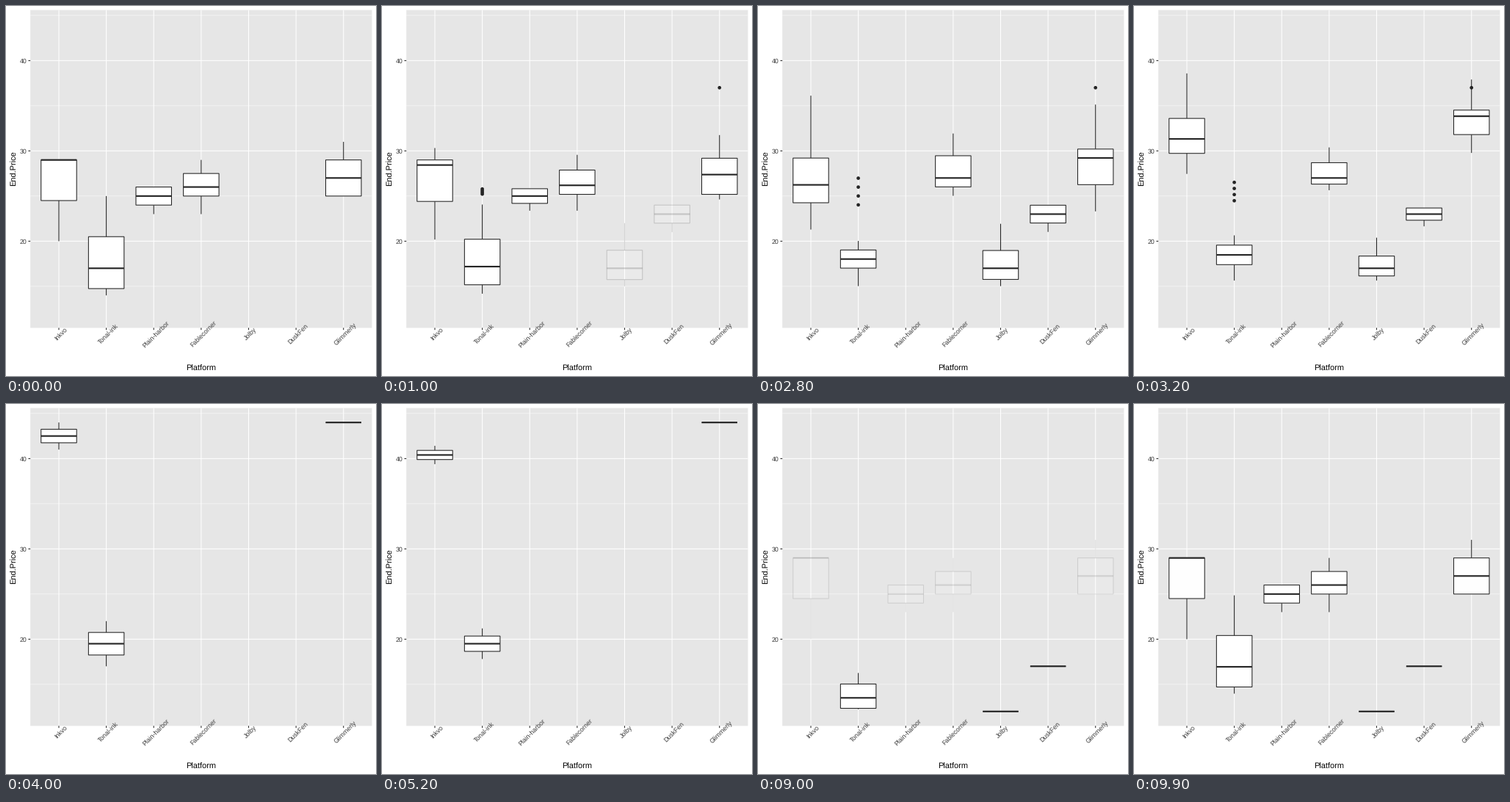
A matplotlib script for the animation above (10 s loop, 504 by 504 pixels).

```python
import math

import matplotlib.pyplot as plt
import numpy as np
from matplotlib.animation import FuncAnimation
from matplotlib.patches import Circle, Polygon, Rectangle

plt.rcParams.update({
    "font.family": "Liberation Sans",
    "path.snap": False,
    "text.hinting": "none",
    "toolbar": "None",
})

SIZE, DPI = 504, 72
FRAMES, INTERVAL, CYCLE = 100, 100, 20
LEFT, RIGHT, TOP, BOTTOM = 33.2, 498.5, 5.5, 438.45
INK, PANEL, LABEL = "#252525", "#e6e6e6", "#3c3c3c"
THIN, NORMAL, THICK = 0.53, 1.07, 2.13

PLATFORMS = ["Inkvo", "Tonal-ink", "Plain-harbor", "Fablecorner",
             "Jolby", "DuskFen", "Glimmerly"]
INKVO, TONAL, PLAIN, FABLE, JOLBY, DUSK, GLIMMER = range(len(PLATFORMS))
SLOT = (RIGHT - LEFT) / (len(PLATFORMS) + 0.2)
LOWEST, HIGHEST = 12, 44
PADDING = 0.05 * (HIGHEST - LOWEST)

# Key prices of each period; the box shapes follow from their quartiles.
PRICES = [
    {INKVO: (20, 29, 29), TONAL: (14, 15, 19, 25), PLAIN: (23, 24, 25, 26, 26),
     FABLE: (23, 25, 26, 27.5, 29), GLIMMER: (25, 25, 27, 29, 31)},
    {INKVO: (21, 24, 26, 29, 36), TONAL: (15, 17, 18, 19, 20), FABLE: (25, 27, 32),
     JOLBY: (15, 16, 18, 22), DUSK: (21, 22, 23, 24, 24),
     GLIMMER: (23, 26, 29, 30, 35)},
    {INKVO: (41, 44), TONAL: (17, 22), GLIMMER: (44,)},
    {INKVO: (36,)},
    {TONAL: (12, 12, 14, 15), JOLBY: (12,), DUSK: (17,)},
]
OUTLIERS = {1: {TONAL: range(24, 28), GLIMMER: (37,)}}


def summarise(prices):
    """Minimum, quartiles and maximum."""
    return np.quantile(prices, np.linspace(0, 1, 5))


STATES = [{index: summarise(prices) for index, prices in period.items()}
          for period in PRICES]


def x_pos(index):
    return LEFT + (index + 0.6) * SLOT


def y_pos(value):
    share = (value - LOWEST + PADDING) / (HIGHEST - LOWEST + 2 * PADDING)
    return BOTTOM - share * (BOTTOM - TOP)


def line(xs, ys, width, color=INK, **kwargs):
    return ax.plot(xs, ys, color=color, lw=width, solid_capstyle="butt", **kwargs)[0]


fig = plt.figure(figsize=(SIZE / DPI, SIZE / DPI), dpi=DPI, facecolor="white")
ax = fig.add_axes([0, 0, 1, 1])
ax.set(xlim=(0, SIZE), ylim=(SIZE, 0))
ax.set_autoscale_on(False)
ax.axis("off")


def draw_axes():
    ax.add_patch(Rectangle((LEFT, TOP), RIGHT - LEFT, BOTTOM - TOP,
                           fc=PANEL, ec="none", zorder=0))
    for value in range(15, 50, 10):
        line([LEFT, RIGHT], [y_pos(value)] * 2, THIN, "white", zorder=1)
    for value in range(20, 50, 10):
        y = y_pos(value)
        line([LEFT, RIGHT], [y, y], NORMAL, "white", zorder=1)
        line([LEFT - 2.75, LEFT], [y, y], NORMAL)
        ax.text(LEFT - 4.9, y + 3.15, str(value), size=8.8, color=LABEL, ha="right")
    for index, name in enumerate(PLATFORMS):
        x = x_pos(index)
        line([x, x], [TOP, BOTTOM], NORMAL, "white", zorder=1)
        line([x, x], [BOTTOM, BOTTOM + 2.75], NORMAL)
        ax.text(x + 4.7, BOTTOM + 10.3, name, size=8.8, color=LABEL, rotation=45,
                rotation_mode="anchor", ha="center", va="baseline")
    ax.text((LEFT + RIGHT) / 2, 497, "Platform", size=11, ha="center")
    ax.text(14, (TOP + BOTTOM) / 2 - 0.5, "End.Price", size=11, rotation=90,
            rotation_mode="anchor", ha="center", va="baseline")


def draw_box(index, stats, alpha):
    x, half = x_pos(index), 0.375 * SLOT
    low, q1, mid, q3, high = y_pos(stats)
    artists = [line([x, x], ends, NORMAL, alpha=alpha, zorder=3)
               for ends in ((q3, high), (q1, low)) if abs(ends[0] - ends[1]) > 0.01]
    corners = [(x - half, q3), (x - half, q1), (x + half, q1), (x + half, q3)]
    artists.append(ax.add_patch(Polygon(corners, fc="white", ec=INK, lw=NORMAL,
                                        joinstyle="miter", alpha=alpha, zorder=4)))
    artists.append(line([x - half, x + half], [mid, mid], THICK,
                        alpha=alpha, zorder=5))
    return artists


def draw_outliers(state, spread):
    """Dots that gather at their mean as the spread goes to zero."""
    artists = []
    for index, values in OUTLIERS.get(state, {}).items():
        centre = np.mean(values)
        for value in values:
            spot = x_pos(index), y_pos(centre + (value - centre) * spread)
            artists.append(ax.add_patch(Circle(spot, 2.35, fc=INK, ec="none", zorder=3)))
    return artists


def transition(frame):
    """Return the current state, the next one and the eased progress."""
    state, step = divmod(frame, CYCLE)
    hold = 7 if state else 6
    u = max(0, (step - hold) / (CYCLE - hold))
    return state, (state + 1) % len(STATES), 0.5 - 0.5 * math.cos(math.pi * u)


moving = []


def draw(frame):
    while moving:
        moving.pop().remove()
    now, after, t = transition(frame)
    old, new = STATES[now], STATES[after]
    for index, stats in old.items():
        # Boxes that leave collapse onto their median.
        goal = new.get(index, stats[2])
        moving.extend(draw_box(index, stats + (goal - stats) * t, 1))
    moving.extend(draw_outliers(now, 1 - t))
    if t > 0:
        for index in new.keys() - old.keys():
            moving.extend(draw_box(index, new[index], t))
        moving.extend(draw_outliers(after, t))
    return moving


draw_axes()
animation = FuncAnimation(fig, draw, frames=FRAMES, interval=INTERVAL,
                          repeat=True, repeat_delay=0, blit=False)
plt.show()
```
